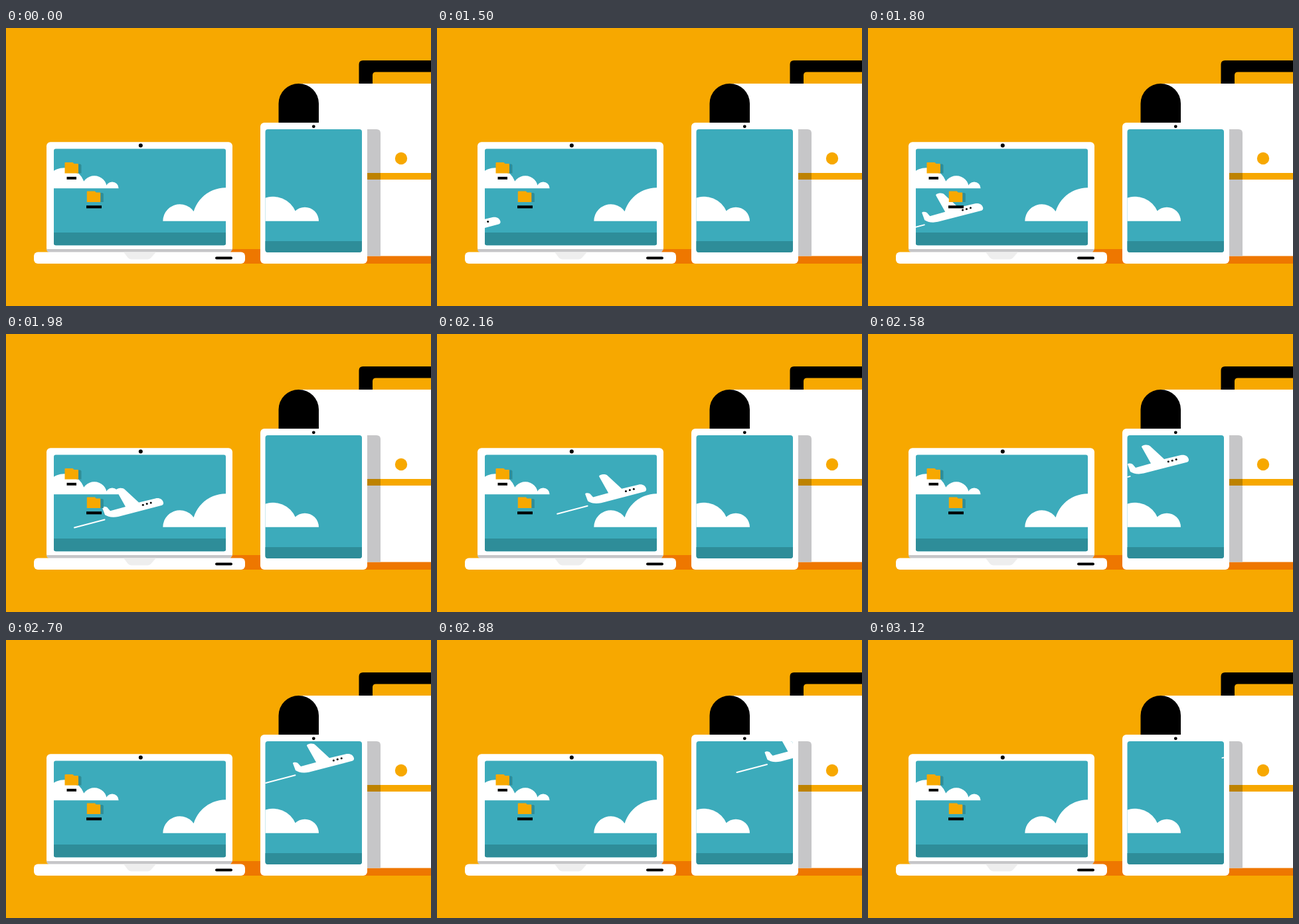
An HTML page for the animation above (3.18 s loop, 640 by 420 pixels).

```html
<!DOCTYPE html>
<html lang="en">
<head>
<meta charset="utf-8">
<title>Plane crossing two screens</title>
<style>
  html, body { margin: 0; width: 100%; height: 100%; overflow: hidden; background: #f7a800; }
  svg { display: block; width: 640px; height: 420px; }
  .amber { fill: #f7a800; }
  .white { fill: #fff; }
  .grey { fill: #c6c6c8; }
  .sky { fill: #3cabbb; }
  .sea { fill: #2e8d99; }
</style>
</head>
<body>
<svg viewBox="0 0 640 420">
  <defs>
    <clipPath id="laptopScreen"><rect x="72" y="182.5" width="259" height="145.7" rx="3"/></clipPath>
    <clipPath id="tabletScreen"><rect x="390.5" y="153" width="145.5" height="186" rx="4"/></clipPath>
    <g id="folder">
      <path class="sea" d="M18 2.5h5.5l1.5 1.5v12.5h-7z"/>
      <path class="amber" d="M0 1q0-1 1-1h11l2 2h5.5q1 0 1 1v13.5h-20.5z"/>
    </g>
    <g id="plane">
      <path d="M-134 36.5L-88.5 24.5" stroke="#fff" stroke-width="2" stroke-linecap="round"/>
      <path class="white" d="M0-1Q.5 1.5-2 2.8L-68 20C-77 22-84 20-88 17.3L-92 6.5Q-92 5-90 5
        Q-85 4.5-83 8L-80 11.3L-57 5L-71-20C-71.5-23-61-25-58-21L-37-1.5L-12-7.5C-6-8.8-1-6 0-1Z"/>
      <circle cx="-30.7" cy="2.2" r="1.5"/>
      <circle cx="-24.8" cy=".6" r="1.5"/>
      <circle cx="-18.8" cy="-1" r="1.5"/>
    </g>
  </defs>

  <rect class="amber" width="640" height="420"/>
  <rect x="330" y="334" width="310" height="22" fill="#ee7700"/>

  <!-- bag -->
  <path d="M531.5 84V55q0-6 6-6H640V66.5H557q-5 0-5 5V84z"/>
  <rect class="white" x="441" y="84" width="199" height="260.5"/>
  <path d="M410.5 150V114a30.25 30 0 0 1 60.5 0V150z"/>
  <rect class="amber" x="540" y="219" width="100" height="10"/>
  <circle class="amber" cx="595" cy="197" r="9.2"/>
  <path class="grey" d="M540 153H558q6 0 6 6V344.5H540z"/>
  <rect x="540" y="219" width="24" height="10" fill="#bd8200"/>

  <!-- tablet -->
  <rect class="white" x="383" y="143" width="161" height="213" rx="6"/>
  <circle cx="463.3" cy="148.8" r="2.4"/>
  <g clip-path="url(#tabletScreen)">
    <rect class="sky" x="390" y="153" width="147" height="187"/>
    <rect class="sea" x="390" y="322" width="147" height="18"/>
    <path class="white" d="M365 291.7a37 37 0 0 1 74 0zM429 291.7a21 21 0 0 1 42 0z"/>
    <use href="#plane" class="flight"/>
  </g>

  <!-- laptop -->
  <rect class="white" x="61" y="172.3" width="280" height="166" rx="6"/>
  <path class="grey" d="M61 334H341L338 339H65q-4-1-4-5z"/>
  <rect class="white" x="42" y="338.5" width="318" height="17.5" rx="6"/>
  <path d="M177 338.5H226L218 347.5Q216 349.5 213 349.5H189Q186 349.5 184 347.5z" fill="#eee"/>
  <rect x="315" y="345.5" width="26" height="4" rx="2"/>
  <circle cx="202.8" cy="177.5" r="3"/>
  <g clip-path="url(#laptopScreen)">
    <rect class="sky" x="72" y="182" width="260" height="147"/>
    <rect class="sea" x="72" y="309" width="260" height="20"/>
    <path class="white" d="M57 242.2a31 31 0 0 1 62 0zM114 242.2a19 19 0 0 1 38 0zM150.2 242.2a9.7 9.7 0 0 1 19.4 0z"/>
    <path class="white" d="M236.3 291.7a25.5 25.5 0 0 1 51 0zM280.5 291.7a50.5 50.5 0 0 1 101 0z"/>
    <use href="#plane" class="flight"/>
    <use href="#folder" x="88.5" y="203"/>
    <rect x="91.5" y="224.8" width="14.5" height="4"/>
    <use href="#folder" x="121.8" y="246.5"/>
    <rect x="121" y="268.2" width="23" height="4.2"/>
  </g>
</svg>
<script>
  const LOOP = 3180, TAKEOFF = 1500, STEP = 60;
  const CLIMB = 0.2655;
  // step, nose x, speed in px per step
  const knots = [
    [0, 95.5, 13],
    [8, 237, 24],
    [14, 394, 24.5],
    [18, 483, 20.5],
    [27, 667.5, 20.5]
  ];
  const planes = document.querySelectorAll('.flight');

  // Cubic Hermite curve through the knots.
  function noseX(step) {
    const k = Math.max(1, knots.findIndex(([s]) => s >= step));
    const [s0, x0, v0] = knots[k - 1];
    const [s1, x1, v1] = knots[k];
    const span = s1 - s0, u = (step - s0) / span, w = 1 - u;
    return w * w * (1 + 2 * u) * x0 + u * u * (3 - 2 * u) * x1
      + span * u * w * (w * v0 - u * v1);
  }

  function draw(time) {
    const step = Math.floor((time % LOOP - TAKEOFF) / STEP);
    const flying = step >= 0;
    const x = flying ? noseX(step) : 0;
    const y = 293.5 - CLIMB * (x - 95.5);
    for (const plane of planes) {
      plane.setAttribute('visibility', flying ? 'visible' : 'hidden');
      plane.setAttribute('transform', `translate(${x.toFixed(2)} ${y.toFixed(2)})`);
    }
  }

  const start = performance.now();
  function tick() {
    draw(performance.now() - start);
    requestAnimationFrame(tick);
  }
  tick();
</script>
</body>
</html>
```
